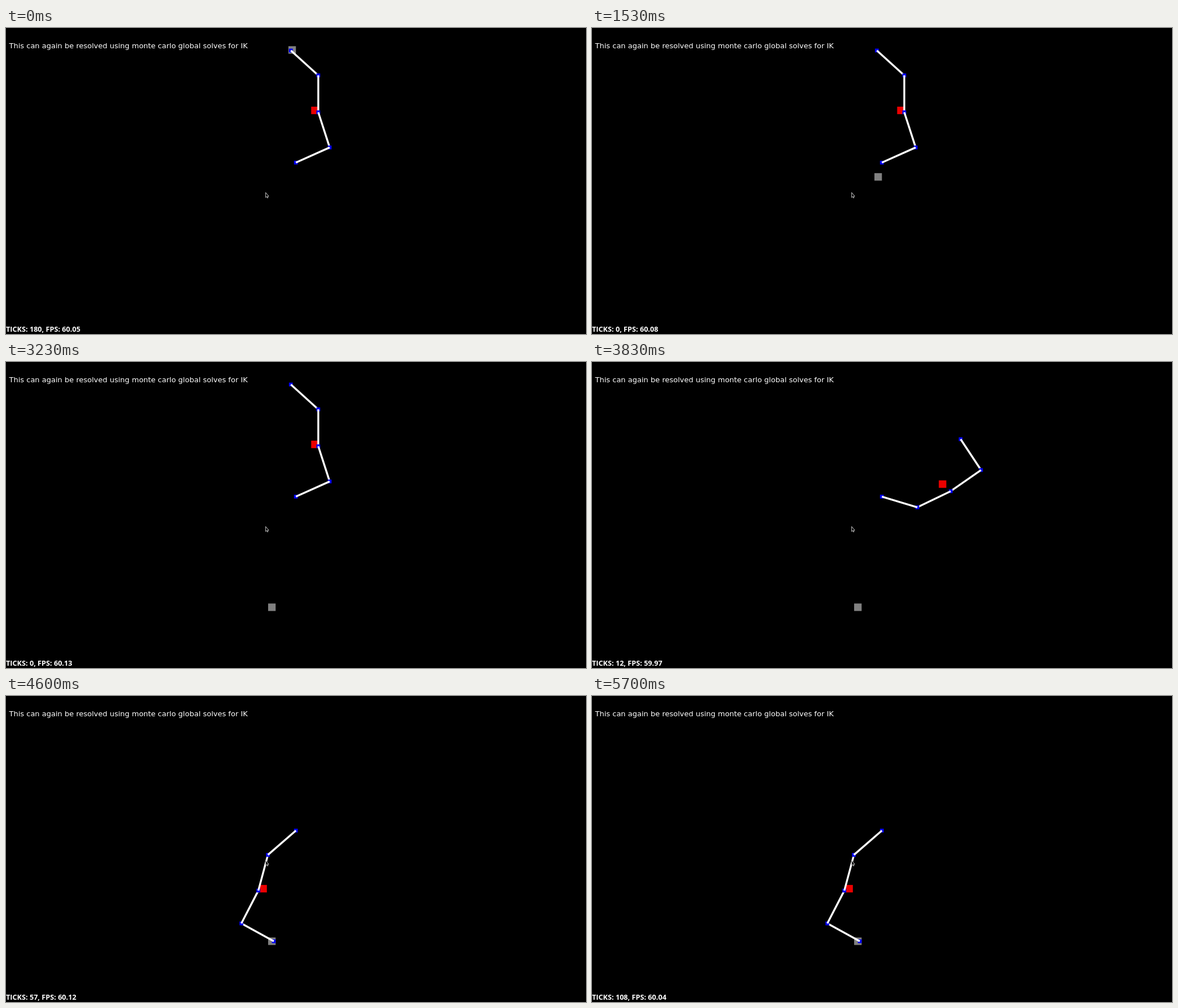
Recreate the animation shown at these times as an HTML page with a canvas. Size 1029 px wide and 544 px high, loop 5730 ms.

```html
<!DOCTYPE html>
<html lang="en">
<head>
<meta charset="utf-8">
<title>IK arm</title>
<style>
html, body { margin: 0; width: 100%; height: 100%; overflow: hidden; background: #000; }
canvas { display: block; }
</style>
</head>
<body>
<canvas id="stage" width="1029" height="544"></canvas>
<script>
const ctx = document.getElementById('stage').getContext('2d');
const LOOP = 5730;
const BASE = { x: 514.3, y: 239.3 };
const LINK = 65.7;
const TURN = 3.42;          // degrees per tick
const TARGET_SPEED = 6.6;   // pixels per step
const SOLVE_STEP = 109;
const LAST_TICK = 108;
const REACHED_TICK = 46;

// Angles in degrees, each relative to the previous link
const REST = [-24.2, -83.7, 17.9, -47.8];
const GOALS = [
  { from: 0, pose: [139, 17, -16, -88.4] },
  { from: 10, pose: [139, 17, 1.6, -88.4] },
  { from: 30, pose: [139, -34, 28, -88.4] },
  { from: 38, pose: [139, -34, 12.3, -88.4] }
];
const cursor = new Path2D('M460.7 292.5V301.3L462.5 299.7L463.7 302.2L465 301.6L463.9 299.1H466.2Z');

const clamp = (v, lo, hi) => Math.min(hi, Math.max(lo, v));

function solveTick(step) {
  const ticks = 2 * (step - SOLVE_STEP);
  return clamp(ticks > 24 ? ticks - 1 : ticks, 0, LAST_TICK);
}

// Every joint turns at the same constant speed towards the current goal
function poseAt(tick) {
  let pose = REST;
  GOALS.forEach(({ from, pose: goal }, i) => {
    const until = i + 1 < GOALS.length ? GOALS[i + 1].from : LAST_TICK;
    const reach = TURN * Math.max(0, Math.min(tick, until) - from);
    pose = pose.map((angle, j) => angle + clamp(goal[j] - angle, -reach, reach));
  });
  return pose;
}

function armPoints(tick) {
  const points = [BASE];
  let angle = 0;
  for (const turn of poseAt(tick)) {
    angle += turn * Math.PI / 180;
    const { x, y } = points[points.length - 1];
    points.push({ x: x + LINK * Math.cos(angle), y: y + LINK * Math.sin(angle) });
  }
  return points;
}

function square(x, y, size, color) {
  ctx.fillStyle = color;
  ctx.fillRect(x - size / 2, y - size / 2, size, size);
}

function drawTarget(step) {
  const down = clamp((step - 11.8) * TARGET_SPEED, 0, 397);
  const left = clamp((step - 87.6) * TARGET_SPEED, 0, 36);
  square(507.7 - left, 39 + down, 13.3, '#808080');
}

function drawArm(points) {
  const links = points.slice(1).map((end, i) => ({ start: points[i], end }));
  const middle = axis => links.reduce((sum, { start, end }) => sum + start[axis] + end[axis], 0) / (2 * links.length);
  const joint = ({ x, y }) => square(x, y, 6.8, '#0000f0');

  square(middle('x'), middle('y'), 13.3, '#eb0000');
  joint(BASE);
  ctx.strokeStyle = '#fff';
  ctx.lineWidth = 3.4;
  for (const { start, end } of links.reverse()) {
    joint(end);
    ctx.beginPath();
    ctx.moveTo(start.x, start.y);
    ctx.lineTo(end.x, end.y);
    ctx.stroke();
  }
}

function drawCursor() {
  ctx.fillStyle = '#000';
  ctx.strokeStyle = '#c8c8c8';
  ctx.lineWidth = 1;
  ctx.fill(cursor);
  ctx.stroke(cursor);
}

function text(value, x, y, font) {
  ctx.font = font;
  ctx.fillStyle = '#fff';
  ctx.fillText(value, x, y);
}

function draw(time) {
  const step = Math.floor((time % LOOP + 3.4) * 0.03);
  const tick = solveTick(step);
  const solving = tick > 0 && tick < REACHED_TICK;
  const shownTick = step < 12 ? 180 : tick;
  const fps = 60.05 + 0.08 * Math.sin(2.4 * Math.floor(step / 5));

  ctx.fillStyle = '#000';
  ctx.fillRect(0, 0, 1029, 544);
  if (!solving) drawTarget(step);
  drawArm(armPoints(tick));
  if (solving) drawTarget(step);
  text('This can again be resolved using monte carlo global solves for IK', 5.5, 36,
    '13.03px "DejaVu Sans", sans-serif');
  text(`TICKS: ${shownTick}, FPS: ${fps.toFixed(2)}`, 0, 540, 'bold 12.68px "Open Sans", sans-serif');
  drawCursor();
}

const start = performance.now();
function loop() {
  draw(performance.now() - start);
  requestAnimationFrame(loop);
}
loop();
</script>
</body>
</html>
```
